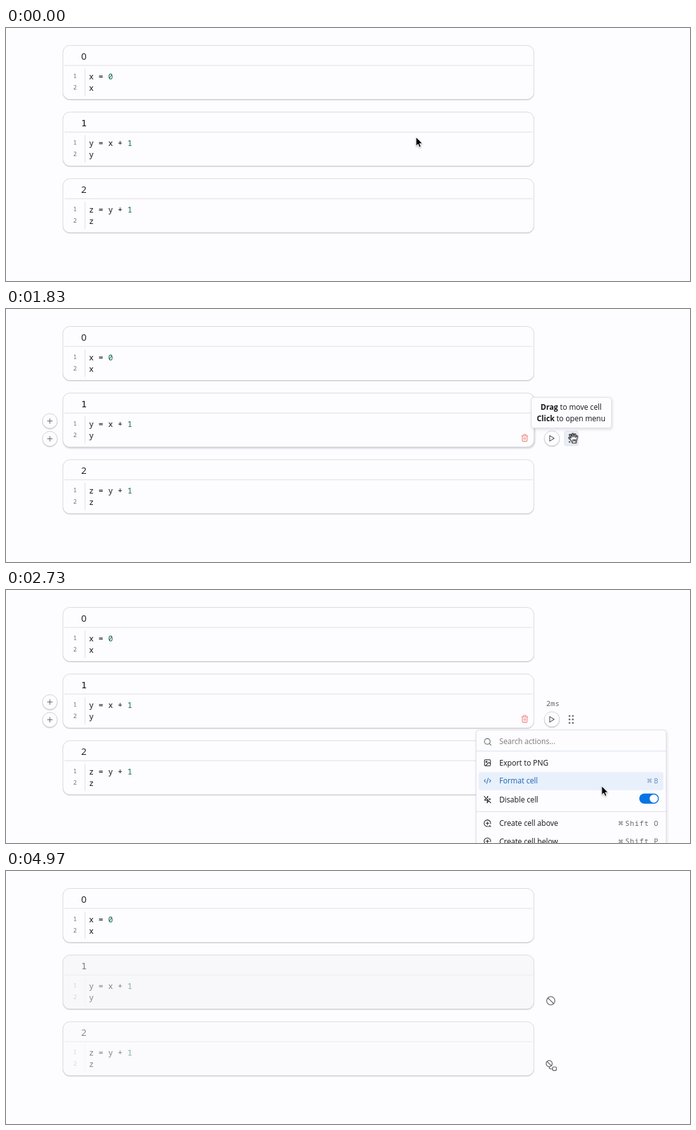
These frames come from a looping animation (1076 by 399 pixels, 5210 ms). An HTML page:

```html
<!DOCTYPE html>
<html lang="en">
<head>
<meta charset="utf-8">
<title>Notebook cells</title>
<style>
  html, body { margin: 0; width: 100%; height: 100%; overflow: hidden; background: #fdfcff; }
  svg { display: block; }
  text { white-space: pre; font-family: "Open Sans", "Noto Sans", sans-serif; font-size: 11.7px; fill: #14161a; }
  .title { font-size: 14.8px; }
  .slab { font-family: "DejaVu Sans Mono", monospace; font-size: 14.4px; }
  .code { font-family: "Noto Sans Mono", "DejaVu Sans Mono", monospace; font-size: 12.6px; }
  .code tspan { fill: #116644; }
  .num { font-family: "Noto Sans Mono", monospace; font-size: 9.4px; fill: #6d6d75; }
  .time { font-family: "Noto Sans Mono", monospace; font-size: 11.6px; fill: #62646b; }
  .keys { font-family: "Noto Sans Mono", monospace; font-size: 11px; letter-spacing: .95px; fill: #60646c; }
  .cmd { font-family: "DejaVu Sans", sans-serif; font-size: 8.5px; fill: #60646c; }
  .mid { text-anchor: middle; }
  .bold { font-weight: 700; }
  .icon { fill: none; stroke: currentColor; stroke-width: 2; stroke-linecap: round; stroke-linejoin: round; }
  .card { fill: #fdfcff; stroke: #d9d8dd; filter: drop-shadow(.6px 1.2px .3px #d3d2d8); }
  .round { fill: #fdfcff; stroke: #d0d0d6; filter: drop-shadow(.8px 1.2px .4px #cfcfd5); }
  .pop { fill: #fdfcff; stroke: #dddde4; filter: drop-shadow(1px 2px 2px rgba(40, 40, 70, .14)); }
  .rule { stroke: #dedde2; }
  .row { color: #14161a; }
  .row text:not(.keys):not(.cmd) { fill: currentColor; }
</style>
</head>
<body>
<svg id="stage" width="1076" height="399" viewBox="0 0 1076 399"></svg>
<script>
const LOOP = 5210;
const INK = '#14161a', BLUE = '#1762b5';

const text = (x, y, cls, body) => `<text x="${x}" y="${y}" class="${cls}">${body}</text>`;
const icon = (x, y, size, d, color = 'currentColor', extra = '') =>
  `<g class="icon" color="${color}" transform="translate(${x} ${y}) scale(${size / 24})"><path d="${d}"/>${extra}</g>`;

const ICONS = {
  search: 'M19 11a8 8 0 1 1-16 0a8 8 0 0 1 16 0M21.5 21.5l-4.8-4.8',
  image: 'M5 3h14a2 2 0 0 1 2 2v14a2 2 0 0 1-2 2H5a2 2 0 0 1-2-2V5a2 2 0 0 1 2-2M11 9a2 2 0 1 1-4 0a2 2 0 0 1 4 0M21 15l-3.1-3.1a2 2 0 0 0-2.8 0L6 21',
  code: 'M18 16l4-4-4-4M6 8l-4 4 4 4M14.5 4l-5 16',
  zapOff: 'M12.4 6.8L13 2l-2.4 2.9M18.6 12.9L21 10h-5.3M8 8l-5 6h9l-1 8 5-6M2 2l20 20',
  above: 'M13 21.5a10 10 0 1 1 8.5-8M12 7.5v9M7.5 12h9M16 22l3-3 3 3',
  below: 'M13 21.5a10 10 0 1 1 8.5-8M12 7.5v9M7.5 12h9M16 19l3 3 3-3',
  trash: 'M3 6h18M19 6v14a2 2 0 0 1-2 2H7a2 2 0 0 1-2-2V6M8 6V4a2 2 0 0 1 2-2h4a2 2 0 0 1 2 2v2M10 11v6M14 11v6',
  ban: 'M22 12a10 10 0 1 1-20 0a10 10 0 0 1 20 0M4.9 4.9l14.2 14.2'
};

function cell(i, first, second) {
  const y = 27.5 + i * 105.1;
  return `<rect id="card${i}" class="card" x="89.5" y="${y}" width="741" height="85" rx="11"/>
    <g id="body${i}">
      <path class="rule" d="M92 ${y + 31.5}H828.5"/>
      ${text(118.3, y + 22.3, i === 1 ? 'title slab' : 'title', i)}
      <g id="gutter${i}">
        <path class="rule" d="M124.2 ${y + 36.5}v43"/>
        ${text(105.8, y + 51.3, 'num', 1)}${text(105.8, y + 69, 'num', 2)}
      </g>
      ${text(130.5, y + 53.3, 'code', first)}${text(130.5, y + 71, 'code', second)}
    </g>`;
}

const plus = y => `<circle class="round" cx="69" cy="${y}" r="11.7"/>
  <path d="M65.2 ${y}h7.6M69 ${y - 3.8}v7.6" stroke="#5b5d64" stroke-linecap="round"/>`;

const dots = [198.7, 204.2, 209.7].map(y =>
  `<circle cx="886.5" cy="${y}" r="1.4"/><circle cx="891.7" cy="${y}" r="1.4"/>`).join('');

function row(i, y, pic, label, keys = '') {
  const x = 1026.8 - keys.length * 7.55;
  const shortcut = keys && text(x - 11.3, y + 3.4, 'cmd', '⌘') + text(x, y + 3.8, 'keys', keys);
  return `<g class="row" id="row${i}">${icon(751.2, y - 6.2, 12.4, ICONS[pic])}
    ${text(776, y + 4.2, '', label)}${shortcut}</g>`;
}

document.getElementById('stage').innerHTML = `
  <rect width="1076" height="399" fill="#fdfcff"/>
  ${cell(0, 'x = <tspan>0</tspan>', 'x')}
  <rect id="lift" x="90" y="134" width="742.5" height="86" rx="11" fill="#d6d6df" style="filter:blur(.9px)"/>
  ${cell(1, 'y = x + <tspan>1</tspan>', 'y')}
  ${cell(2, 'z = y + <tspan>1</tspan>', 'z')}
  <g id="tools">
    ${plus(176.7)}${plus(204.7)}
    ${icon(809.5, 196.7, 13, ICONS.trash, '#ee8379')}
    ${text(849.8, 183.3, 'time', '2ms')}
    <circle class="round" cx="858.8" cy="204" r="12"/>
    <path d="M855.3 199.6v8.8l7-4.4z" fill="none" stroke="#4c4e55" stroke-width="1.1" stroke-linejoin="round"/>
    <rect id="grip" x="878.5" y="192.5" width="21.5" height="23" rx="3" fill="#e9edf5" stroke="#dfe3ec"/>
    <g fill="#66686f">${dots}</g>
  </g>
  <g id="off">
    ${icon(849.2, 196.9, 15.6, ICONS.ban, '#686a70')}
    <g fill="none" stroke="#55575d" stroke-width="1.2" stroke-linecap="round">
      <circle cx="854.5" cy="303.7" r="4.8"/>
      <path d="M851.1 300.3l6.8 6.8M854.5 308.5v1a2.5 2.5 0 0 0 2.5 2.5h2.6"/>
      <rect x="859.8" y="309" width="6" height="5.7" rx="1.4"/>
    </g>
  </g>
  <g id="tip">
    <rect class="pop" x="826.2" y="139.3" width="126.3" height="48.4" rx="4"/>
    ${text(889, 159.2, 'mid', '<tspan class="bold">Drag</tspan> to move cell')}
    ${text(889, 177.2, 'mid', '<tspan class="bold">Click</tspan> to open menu')}
  </g>
  <g id="menu">
    <rect class="pop" x="739.5" y="220.8" width="299" height="220" rx="4"/>
    ${icon(751, 232.7, 13.4, ICONS.search, '#62656c')}
    <g style="opacity:.56">${text(776, 243.4, '', 'Search actions...')}</g>
    <path id="caret" d="M776.8 231.5v15.5" stroke="#14161a" stroke-width="1.1"/>
    <path d="M740 254H1038" stroke="#d3dfee"/>
    <rect id="glow" x="743.5" y="258.5" width="290.5" height="28.3" rx="3" fill="#e8f0fb"/>
    ${row(0, 272.5, 'image', 'Export to PNG')}
    ${row(1, 301, 'code', 'Format cell', 'B')}
    ${row(2, 330.5, 'zapOff', 'Disable cell')}
    <rect x="996.2" y="321" width="30.8" height="16" rx="8" fill="#0874e4"/>
    <circle cx="1019" cy="329" r="6.5" fill="#fff"/>
    <path d="M740 349.5H1038" class="rule"/>
    ${row(3, 368, 'above', 'Create cell above', 'Shift O')}
    ${row(4, 396.3, 'below', 'Create cell below', 'Shift P')}
  </g>
  <path id="hand" transform="translate(884.3 195.2)" fill="#fff" stroke="#000" stroke-width="1.1" stroke-linejoin="round"
    d="M4.7 12.2L1.2 8.4C.3 7.2 1.9 6.1 3 7L4.5 8.3L2.8 3.9C2.4 2.4 4.3 1.9 4.9 3.2L6.5 6.8L6.2 2C6.2.5 8.3.5 8.5 2L9.2 6.6L9.9 2.4C10.3 1 12.2 1.4 12.1 2.9L11.8 7.4L13.1 5.1C13.9 3.9 15.6 4.8 15.1 6.2L13.5 11.2C13 13 12.8 13.8 12.7 16.2H6.7C6.5 14.3 5.8 13.4 4.7 12.2ZM7.6 10.2v3.2M9.6 10.2v3.2M11.4 10.2v3.2"/>
  <g id="mouse">
    <path d="M0 0V14.2L3.2 11.2L5.3 16.1L7.8 15L5.7 10.2H10.1Z" fill="#000" stroke="#fff" stroke-width="1"
      stroke-linejoin="round" style="filter:drop-shadow(0 1px 1px rgba(0,0,0,.3))"/>
  </g>`;

// Rows are [ms, value]; values hold until the next row unless smooth.
function track(id, prop, rows, smooth = false) {
  const easing = smooth ? 'linear' : 'step-end';
  const frames = rows.map(([ms, value]) => ({ offset: ms / LOOP, [prop]: value, easing }));
  frames.push({ offset: 1, [prop]: rows[rows.length - 1][1] });
  document.getElementById(id).animate(frames, { duration: LOOP, iterations: Infinity });
}

const at = (x, y) => `translate(${x}px, ${y}px)`;
const fade = (id, from, to, a, b) => track(id, 'opacity', [[0, a], [from, a], [to, b]], true);

track('mouse', 'transform', [
  [0, 645, 172], [30, 645, 172], [200, 672, 174], [400, 738, 171], [530, 778, 167], [700, 814, 163],
  [870, 843, 163], [970, 868, 180], [1070, 885, 195], [1300, 889, 199], [1570, 889, 199],
  [2630, 889, 201], [2680, 918, 265], [2730, 937, 309], [2900, 938, 314], [3130, 932, 319],
  [3230, 922, 323], [3330, 915, 325], [3600, 914, 326], [4469, 914, 326],
  [4470, 890, 215], [4499, 890, 215], [4500, 851, 71]
].map(([ms, x, y]) => [ms, at(x, y)]), true);
track('mouse', 'opacity', [[0, 1], [1600, 0], [2630, 1], [4530, 0]]);
track('hand', 'opacity', [[0, 0], [1600, 1], [2630, 0]]);

track('tools', 'opacity', [[0, 0], [60, 1], [800, 0], [1570, 1], [3870, 0]]);
track('lift', 'opacity', [[0, 0], [60, 1], [800, 0], [1570, 1], [2630, 0]]);
track('grip', 'opacity', [[0, 0], [1600, 1], [2630, 0]]);
track('tip', 'opacity', [[0, 0], [1680, 0], [1780, 1], [2110, 1], [2170, 0]], true);

track('menu', 'opacity', [[0, 0], [2160, 0], [2300, 1], [3870, 1], [3930, 0]], true);
track('caret', 'opacity', [[0, 1], [2640, 0], [3180, 1]]);
track('glow', 'transform', [[0, at(0, 0)], [2690, at(0, 28.8)], [3180, at(0, 58.3)]]);
track('row0', 'color', [[0, BLUE], [2690, INK]]);
track('row1', 'color', [[0, INK], [2690, BLUE], [3180, INK]]);
track('row2', 'color', [[0, INK], [3180, BLUE]]);
document.querySelectorAll('#row1 .cmd, #row1 .keys').forEach((el, i) => {
  el.id = 'hint' + i;
  track(el.id, 'fill', [[0, '#60646c'], [2690, '#6590c2'], [3180, '#60646c']]);
});

for (const [i, fill] of [[1, '#f8f7fa'], [2, '#fbfafd']]) {
  fade('body' + i, 3870, 4070, 1, .52);
  fade('gutter' + i, 3870, 4070, 1, .5);
  track('card' + i, 'fill', [[0, '#fdfcff'], [3870, '#fdfcff'], [4070, fill]], true);
}
fade('off', 3870, 3990, 0, 1);
</script>
</body>
</html>
```
